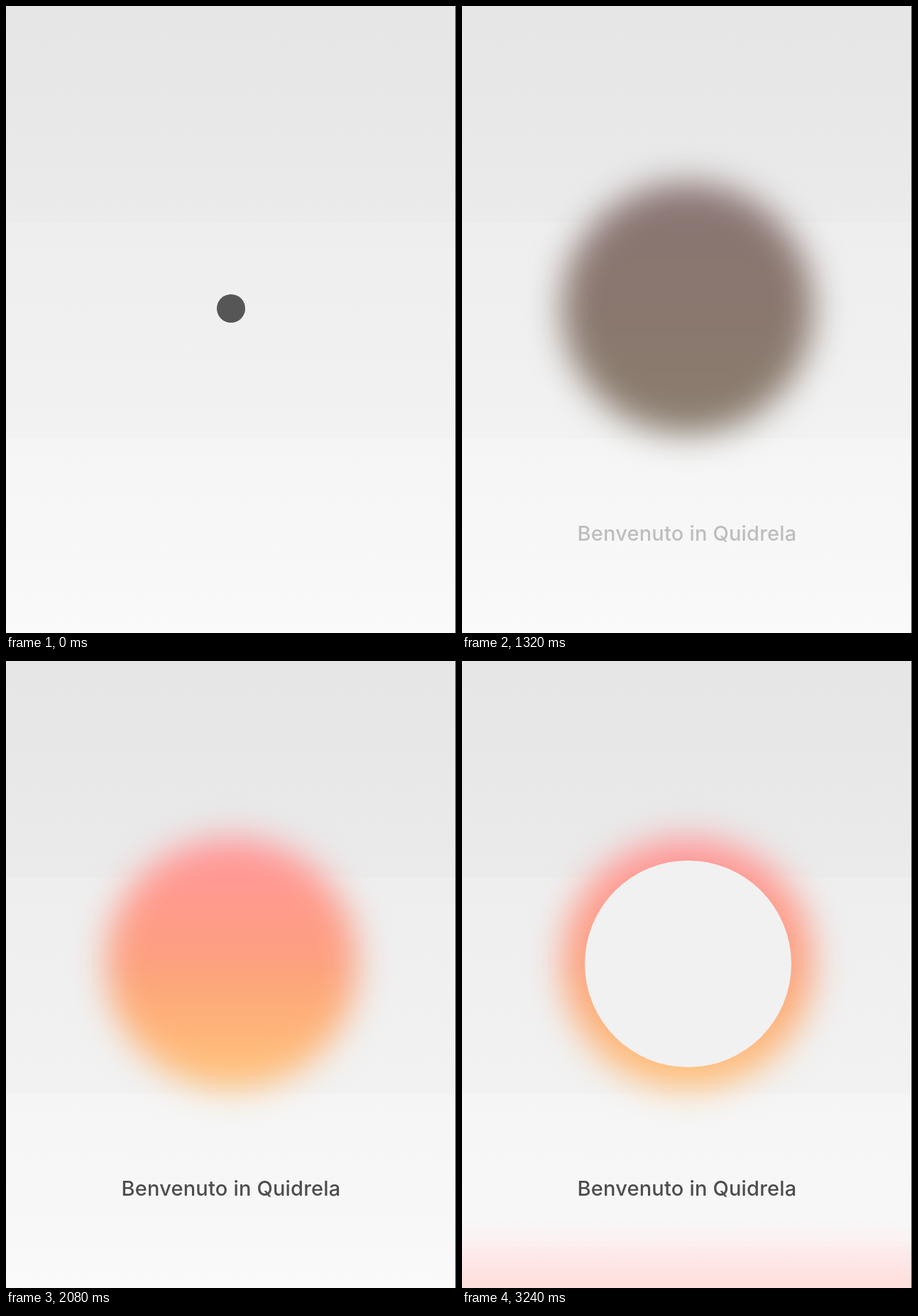
An HTML page that plays this animation: 634 by 883 pixels, repeating every 3.26 s.

```html
<!DOCTYPE html>
<html lang="it">
<head>
<meta charset="utf-8">
<title>Benvenuto</title>
<style>
  html, body { margin: 0; width: 100%; height: 100%; overflow: hidden; }

  .stage {
    position: relative;
    width: 634px;
    height: 883px;
    overflow: hidden;
    background: linear-gradient(
      #e6e6e6 0, #e7e7e7 100px, #e9e9e9 205px, #ebebeb 304px,
      #eeeeee 304px, #f0f0f0 457px, #f2f2f2 609px,
      #f5f5f5 609px, #f6f6f6 660px, #f8f8f8 812px, #fafafa 883px);
  }

  .stage * { position: absolute; }

  .glow, .core, .shade, .disc, .dot, .label, .dawn {
    animation: 3260ms linear infinite both;
  }

  .round { border-radius: 50%; }

  /* Blurred sun: grows grey, then its shade lifts to show the colours */
  .glow {
    left: 141px; top: 249px; width: 354px; height: 354px;
    filter: blur(24px);
    animation-name: appear;
  }
  .core {
    inset: 0;
    overflow: hidden;
    background: linear-gradient(#ff979c, #ff9a8c 25%, #fca07e 50%, #fdac78 65%, #ffc47c);
    animation-name: grow;
  }
  .shade { inset: -1px; background: #74706c; animation-name: lift; }

  .disc {
    left: 172.5px; top: 280.5px; width: 291px; height: 291px;
    background: #f1f1f1;
    animation-name: reveal;
  }
  .dot {
    left: 297px; top: 406px; width: 40px; height: 40px;
    background: #565656;
    animation-name: shrink;
  }
  .dawn {
    left: 0; bottom: 0; width: 100%; height: 95px;
    background: linear-gradient(#fdeaea00, #fcefee99 25%, #fde9e9 50%, #fddeda);
    animation-name: reveal;
  }
  .text { inset: 0; width: 634px; height: 883px; }
  .label {
    font: 500 29px Inter, "Open Sans", sans-serif;
    letter-spacing: .2px;
    text-anchor: middle;
    fill: #4d4d4d;
    animation-name: write;
  }
  .edge { right: 0; top: 0; width: 1px; height: 100%; background: #444; }

  @keyframes appear {
    0%, 2.15% { opacity: 0; animation-timing-function: ease-in-out; }
    24.23%, 100% { opacity: 1; }
  }
  @keyframes grow {
    0%, 2.15% { transform: scale(.29); animation-timing-function: ease-in-out; }
    24.23%, 100% { transform: none; }
  }
  @keyframes shrink {
    0%, 2.15% { transform: none; animation-timing-function: ease-in-out; }
    24.23%, 100% { transform: scale(0); }
  }
  @keyframes lift {
    0%, 36.2% { opacity: 1; animation-timing-function: ease-in-out; }
    51.5%, 100% { opacity: 0; }
  }
  @keyframes write {
    0%, 33.1% { opacity: 0; animation-timing-function: ease-in-out; }
    51.5%, 100% { opacity: 1; }
  }
  @keyframes reveal {
    0%, 63.2% { opacity: 0; animation-timing-function: ease-in-out; }
    82.2%, 100% { opacity: 1; }
  }
</style>
</head>
<body>
<div class="stage">
  <div class="glow"><div class="core round"><div class="shade"></div></div></div>
  <div class="disc round"></div>
  <div class="dot round"></div>
  <div class="dawn"></div>
  <svg class="text" viewBox="0 0 634 883">
    <text class="label" x="317" y="753">Benvenuto in Quidrela</text>
  </svg>
  <div class="edge"></div>
</div>
</body>
</html>
```
